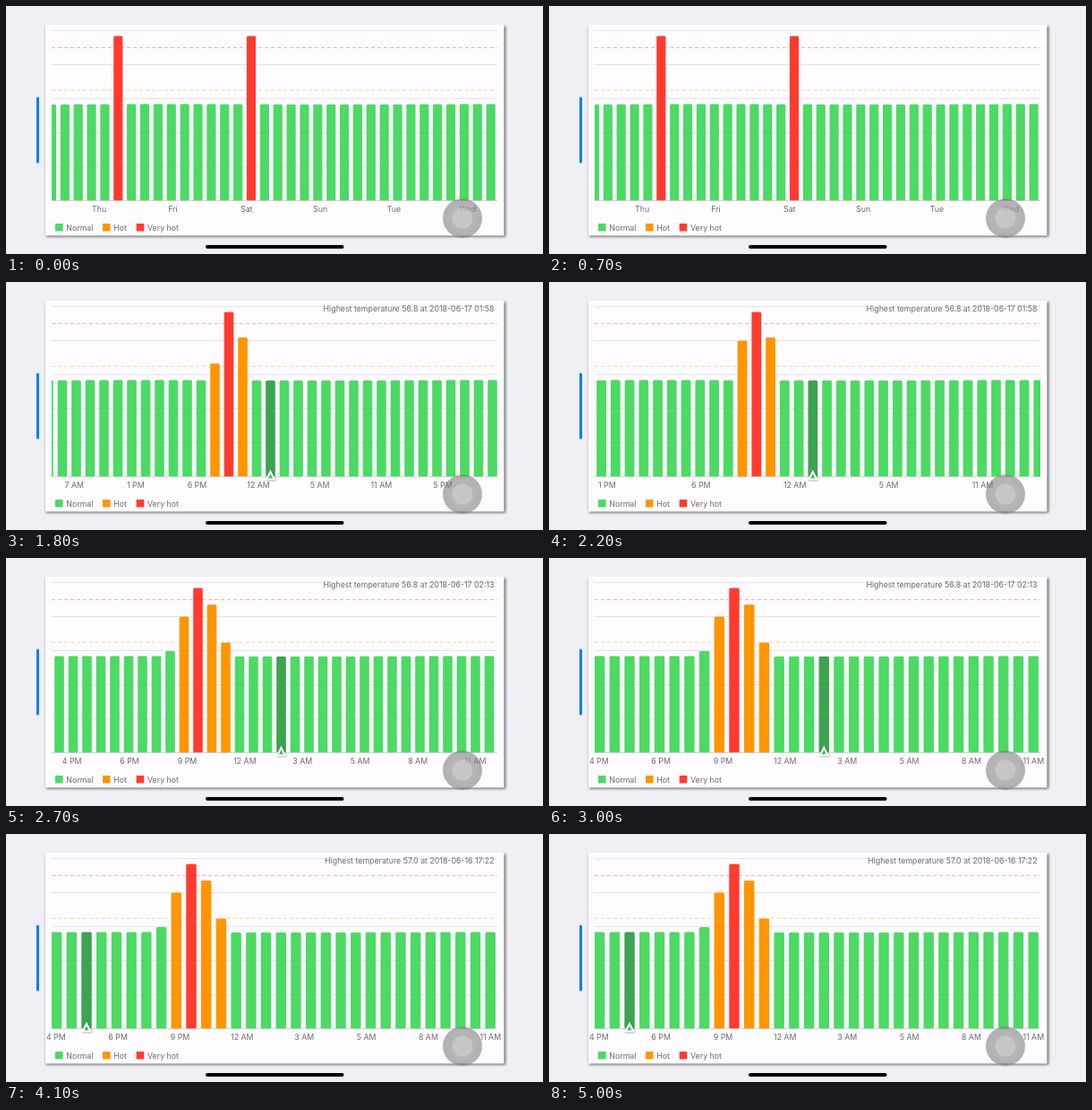
These frames come from a looping animation (600 px wide and 277 px high, 5.1 s). An HTML page with a canvas:

```html
<!DOCTYPE html>
<html lang="en">
<head>
<meta charset="utf-8">
<title>Temperature chart</title>
<style>
  html, body { margin: 0; width: 100%; height: 100%; overflow: hidden; background: #efeff4; }
  canvas { display: block; width: 600px; height: 277px; }
</style>
</head>
<body>
<canvas id="stage"></canvas>
<script>
const LOOP = 5100, STEP = 100;
const GREEN = '#4cd964', ORANGE = '#ff9500', RED = '#ff3b30', DARK = '#3ca350';
const BASE = 217.5, LEFT = 51, RIGHT = 549;
const DAYS = ['Sun', 'Mon', 'Tue', 'Wed', 'Thu', 'Fri', 'Sat'];

// midnight: its x; scale: px per hour; peak: x of the tallest bar; pitch: bar distance.
// tops and marked are counted in bars from the peak.
const evening = { '-2': 104, '-1': 65.5, 0: 33.5, 1: 52, 2: 94.5 };
const early = { midnight: 284, scale: 3.05, peak: 274, pitch: 14.87, tops: { '-10': 33.5, 0: 33.5 } };
const late = { midnight: 254.6, scale: 24.95, peak: 207, pitch: 16.71, tops: evening };
const keys = [
  { at: 0, ...early },
  { at: 1000, ...early },
  { at: 1400, midnight: 284, scale: 6.65, peak: 269.7, pitch: 15.09,
    tops: { '-1': 75, 0: 33.5 }, marked: 1, note: '56.9 at 2018-06-17 00:43' },
  { at: 1800, midnight: 278.5, scale: 12.3, peak: 249, pitch: 15.5,
    tops: { '-1': 91, 0: 33.5, 1: 62 }, marked: 3, note: '56.8 at 2018-06-17 01:58' },
  { at: 2200, midnight: 269.2, scale: 18.8, peak: 231.8, pitch: 15.75,
    tops: { '-1': 65.5, 0: 33.5, 1: 62 }, marked: 4, note: '56.8 at 2018-06-17 01:58' },
  { at: 2700, midnight: 258.3, scale: 23.17, peak: 214.5, pitch: 15.5,
    tops: evening, marked: 6, note: '56.8 at 2018-06-17 02:13' },
  { at: 3000, ...late, marked: 6, note: '56.8 at 2018-06-17 02:13' },
  { at: 4400, ...late, marked: -7, note: '57.0 at 2018-06-16 17:22' },
  { at: LOOP, ...late, marked: -7, note: '57.0 at 2018-06-16 17:22' }
];

// Axis labels by zoom: [smallest scale, first hour from midnight, hours apart]
const ticks = [[23, 0.37, 2.78], [11.5, 0.29, 5.58], [4.5, -5.26, 11.17], [0, -5, 27]];

const canvas = document.getElementById('stage');
const ratio = Math.max(1, window.devicePixelRatio || 1);
canvas.width = 600 * ratio;
canvas.height = 277 * ratio;
const ctx = canvas.getContext('2d');

function viewAt(time) {
  const i = Math.max(1, keys.findIndex(key => key.at > time));
  const a = keys[i - 1], b = keys[i];
  const p = (time - a.at) / (b.at - a.at);
  const mix = name => a[name] + (b[name] - a[name]) * p;
  return {
    ...(p < 0.5 ? a : b),
    midnight: mix('midnight'), peak: mix('peak'), pitch: mix('pitch'),
    scale: a.scale * (b.scale / a.scale) ** p
  };
}

function box(x, y, w, h, r, color) {
  ctx.fillStyle = color;
  ctx.beginPath();
  ctx.roundRect(x, y, w, h, r);
  ctx.fill();
}

function line(y, color, dash = []) {
  ctx.strokeStyle = color;
  ctx.lineWidth = 0.8;
  ctx.setLineDash(dash);
  ctx.beginPath();
  ctx.moveTo(LEFT, y);
  ctx.lineTo(RIGHT, y);
  ctx.stroke();
  ctx.setLineDash([]);
}

function text(string, x, y, align = 'left') {
  ctx.fillStyle = '#6b6b6f';
  ctx.font = '8.8px Inter, "Open Sans", sans-serif';
  ctx.textAlign = align;
  ctx.fillText(string, x, y);
}

function disc(radius, color) {
  ctx.fillStyle = color;
  ctx.beginPath();
  ctx.arc(510, 237, radius, 0, Math.PI * 2);
  ctx.fill();
}

function clipped(x, w, draw) {
  ctx.save();
  ctx.beginPath();
  ctx.rect(x, 20, w, 237);
  ctx.clip();
  draw();
  ctx.restore();
}

function shadow(color, blur, offset) {
  ctx.shadowColor = color;
  ctx.shadowBlur = blur * ratio;
  ctx.shadowOffsetX = ctx.shadowOffsetY = offset * ratio;
}

function drawBars({ peak, pitch, tops, marked }) {
  const width = pitch * 0.685;
  const first = Math.floor((LEFT - peak) / pitch), last = Math.ceil((RIGHT - peak) / pitch);
  for (let k = first; k <= last; k++) {
    const top = tops[k] ?? 109.8 + 0.3 * Math.sin(k / 4);
    const color = k === marked ? DARK : top < 46 ? RED : top < 100 ? ORANGE : GREEN;
    box(peak + k * pitch - width / 2, top, width, BASE - top, 1.5, color);
  }
}

function drawMarker(x) {
  ctx.save();
  shadow('rgba(0,0,0,.4)', 2, 0.5);
  ctx.beginPath();
  ctx.moveTo(x, 212);
  ctx.lineTo(x + 4.3, 220.3);
  ctx.lineTo(x - 4.3, 220.3);
  ctx.closePath();
  ctx.fillStyle = GREEN;
  ctx.fill();
  ctx.strokeStyle = '#fff';
  ctx.lineWidth = 2.3;
  ctx.stroke();
  ctx.restore();
}

function hourName(hour) {
  const h = ((Math.floor(hour) % 24) + 24) % 24;
  return `${h % 12 || 12} ${h < 12 ? 'AM' : 'PM'}`;
}

function dayName(hour) {
  return DAYS[((Math.floor(hour / 24) % 7) + 7) % 7];
}

function drawLabels({ midnight, scale }) {
  const [limit, origin, gap] = ticks.find(([least]) => scale >= least);
  for (let k = -12; k <= 12; k++) {
    const hour = origin + k * gap, x = midnight + hour * scale;
    if (x > 50 && x < 550) text(limit ? hourName(hour) : dayName(hour), x, 229.5, 'center');
  }
}

function draw(time) {
  const view = viewAt(time);
  ctx.setTransform(ratio, 0, 0, ratio, 0, 0);
  ctx.fillStyle = '#efeff4';
  ctx.fillRect(0, 0, 600, 277);

  ctx.save();
  shadow('rgba(0,0,0,.65)', 3, 1);
  box(44, 20.5, 512.5, 236, 0, '#fefcff');
  ctx.restore();

  for (let i = 0; i < 5; i++) line(27.5 + i * 38, '#dfdee2');
  line(46.5, '#ff9c94', [4, 3]);
  line(94.2, '#ffc878', [4, 3]);

  clipped(LEFT, RIGHT - LEFT, () => drawBars(view));
  line(BASE, '#c9c8cc');
  clipped(44, 512.5, () => drawLabels(view));
  if (view.note) {
    drawMarker(view.peak + view.marked * view.pitch);
    text('Highest temperature ' + view.note, 545.5, 32.5, 'right');
  }

  [[55, GREEN, 'Normal'], [108, ORANGE, 'Hot'], [145.7, RED, 'Very hot']].forEach(([x, color, name]) => {
    box(x, 243, 8.6, 8.6, 0.5, color);
    text(name, x + 12.3, 250.6);
  });

  box(34, 101.5, 3, 74, 1.5, '#087df5');
  box(223, 267, 154.5, 4, 2, '#000');

  disc(22, 'rgba(125,125,125,.58)');
  disc(16.5, 'rgba(185,185,185,.35)');
  disc(11.5, 'rgba(215,215,215,.5)');
}

function tick() {
  const time = performance.now() % LOOP;
  draw(Math.floor(time / STEP) * STEP);
  requestAnimationFrame(tick);
}
tick();
</script>
</body>
</html>
```
